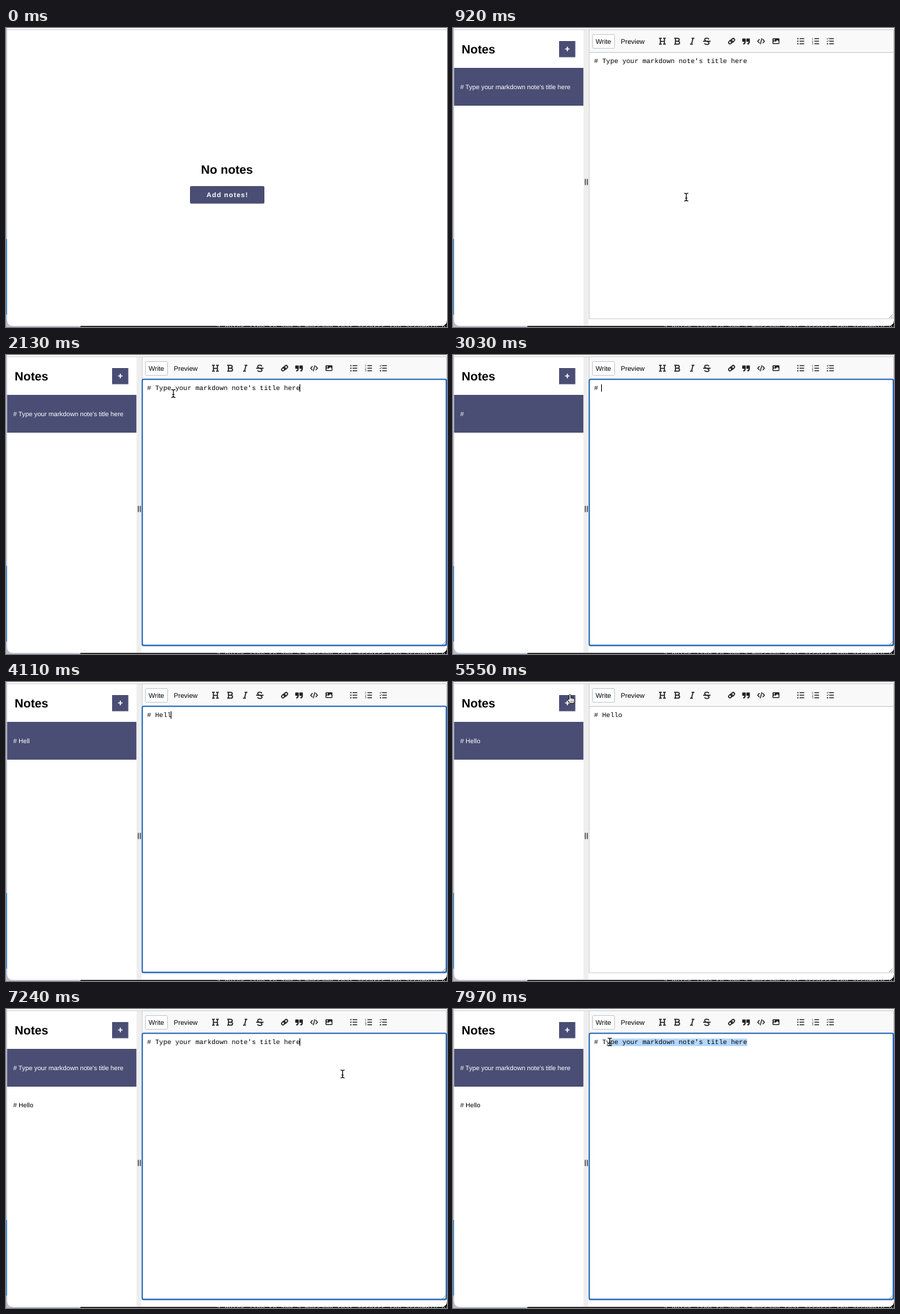
These frames come from a looping animation (640x435 px, 8 s). An HTML page:

```html
<!DOCTYPE html>
<html lang="en">
<head>
<meta charset="utf-8">
<title>Markdown notes</title>
<style>
html, body { margin: 0; width: 100%; height: 100%; overflow: hidden; background: #fff; }
svg { display: block; width: 640px; height: 435px; }
text { font: 9.73px Arial, "Liberation Sans", sans-serif; text-rendering: geometricPrecision; white-space: pre; }
.mono { font-family: "Courier New", "Liberation Mono", monospace; }
.title { font-size: 17.6px; font-weight: bold; }
.note { font-size: 9.35px; }
.line { fill: none; stroke: #222; stroke-width: 1.5; }
</style>
</head>
<body>
<svg viewBox="0 0 640 435">
  <!-- desktop behind the window -->
  <rect width="640" height="435" fill="#b9bccb"/>
  <rect y="307" width="2" height="110" fill="#2f7fc0"/>
  <rect x="108" y="420" width="532" height="15" fill="#050505"/>
  <text class="mono" x="288" y="438" fill="#bbb">-  a quick line to add a message that asserts the assembly has</text>
  <path d="M1.5 0H640V425q0 8.500-9 8.500H10.500q-9 0-9-9z" fill="#fff"/>
  <rect x="1.500" y="2" width="638.500" height="1" fill="#d2d2d6"/>

  <g id="empty">
    <text class="title" x="320.700" y="211.500" text-anchor="middle">No notes</text>
    <rect x="267" y="230" width="108" height="25.500" rx="2" fill="#4a4e74"/>
    <text x="291" y="246.300" fill="#fff" font-weight="bold" style="font-weight:bold" letter-spacing="1">Add notes!</text>
  </g>

  <g id="app">
    <text class="title" x="12.500" y="36.500">Notes</text>
    <rect x="154" y="19" width="23.500" height="23.500" fill="#4a4e74"/>
    <path d="M162.700 30.500h6.400M165.900 27.300v6.400" stroke="#fff" stroke-width="1.600"/>
    <rect x="1.500" y="58" width="188" height="55" fill="#4a4e74"/>
    <text class="note" id="first" x="10.500" y="89.300" fill="#fff"></text>
    <text class="note" id="second" x="10.500" y="143.300"># Hello</text>

    <rect x="189.500" y="3" width="7" height="430" fill="#eee"/>
    <path d="M192 219.500v9M195 219.500v9" stroke="#222" stroke-width="1.200"/>

    <rect x="197.500" y="2.500" width="442" height="420.500" fill="#fff" stroke="#c8ccd0"/>
    <path d="M198 3h441v32h-441z" fill="#f9f9f9"/>
    <path d="M198 35.500h441" stroke="#c8ccd0"/>
    <rect x="202.500" y="9.500" width="32" height="20" rx="1" fill="#fff" stroke="#c8ccd0"/>
    <text x="207" y="22.600">Write</text>
    <text x="243.500" y="22.600">Preview</text>

    <g id="icons" fill="#222">
      <path class="line" d="M301 15v9M306.800 15v9M301 19.500h6M299 15h4M304.800 15h4M299 23.500h4M304.800 23.500h4"/>
      <path class="line" d="M322.800 15v9M321 15h5q2.300 0 2.300 2t-2.300 2.200h-3M326 19.200q2.800 0 2.800 2.200t-2.800 2.200h-5"/>
      <path class="line" d="M348.300 15l-2.200 8.600M346.300 15h4M344 23.500h4"/>
      <path class="line" d="M371.500 16.500q-1-1.700-3.200-1.700q-3 0-3 2t3 2.600q3.300.6 3.300 2.600t-3.300 2.100q-2.500 0-3.300-1.800M363 19.300h10.800" stroke-width="1.400"/>
      <g class="line" transform="translate(404.300 19.200) rotate(-45)">
        <rect x="-5" y="-2.300" width="6" height="4" rx="2"/>
        <rect x="-1" y="-1.700" width="6" height="4" rx="2"/>
      </g>
      <path id="quote" d="M420.500 15.200h3.500q.8 0 .8.800v4q0 4-3.600 4v-1.700q1.600 0 1.600-2.300h-2.300q-.8 0-.8-.8v-3.200q0-.8.8-.8z"/>
      <use href="#quote" x="6"/>
      <path class="line" d="M444.800 16.300l-2.600 2.900l2.600 2.900M449.400 16.300l2.600 2.900l-2.600 2.900M448.200 14.800l-2.200 8.800" style="stroke-width:1.300"/>
      <rect x="463.700" y="15" width="10" height="8.300" rx="1"/>
      <path d="M465 22v-1.500l1.600-1.500l1.300 1.200l2.800-2.700l1.800 2v2.500z" fill="#fff"/>
      <circle cx="466.200" cy="17.300" r="1" fill="#fff"/>
    </g>

    <rect id="selection" y="43" height="11" fill="#b3d7ff"/>
    <text class="mono" id="editor" x="204.800" y="51.300" style="font-size:9.740px"></text>
    <rect id="caret" y="42.500" width="1" height="11" fill="#000"/>
    <path d="M633 422l5-5M636 422l2-2" stroke="#777" stroke-width=".8"/>
    <rect id="focus" x="197.700" y="35.300" width="441.300" height="387.200" rx="2" fill="none" stroke="#1a60b8" stroke-width="1.800"/>
  </g>

  <g id="cursor" stroke-linejoin="round">
    <path id="arrow" d="M0 0v11.500l2.700-2.500l1.800 4l1.900-.8l-1.800-3.900h3.700z" fill="#000" stroke="#fff" stroke-width=".9"/>
    <g id="hand" fill="#fff" stroke="#000" stroke-width=".9">
      <path d="M-1.500 6.300V.4a1.200 1.200 0 0 1 2.400 0V4.200q1.200-.9 2.100.2q1.200-.7 1.900.5q1.700-.3 1.700 1.300v2.400l-1.100 3.300h-5.600L-3.600 7.500q-.5-1.800.9-1.500z"/>
      <path d="M.9 4.200v2.300M3 4.600v2M4.900 5.200v1.700M.9 8v2M2.700 8v2M4.500 8v2" stroke-width=".6"/>
    </g>
    <g id="beam" fill="none">
      <path id="stem" d="M-3-5.700q3 0 3 1.700v8q0 1.700-3 1.700M3-5.700q-3 0-3 1.700v8q0 1.700 3 1.700M-1.600 1.500h3.200" stroke="#fff" stroke-width="2.200" stroke-opacity=".8"/>
      <path d="M-3-5.700q3 0 3 1.700v8q0 1.700-3 1.700M3-5.700q-3 0-3 1.700v8q0 1.700 3 1.700M-1.600 1.500h3.200" stroke="#000" stroke-width="1.100"/>
    </g>
  </g>
</svg>
<script>
const LOOP = 8000, LEFT = 204.8, CHAR = 5.845;
const PLACEHOLDER = "# Type your markdown note's title here";
const $ = id => document.getElementById(id);
const show = (id, on) => $(id).setAttribute("visibility", on ? "inherit" : "hidden");
const between = (t, a, b) => t >= a && t < b;

// Mouse path: time, x, y
const path = [
  [0, 434, 440], [30, 432, 432], [380, 378, 330], [740, 338.5, 246], [1110, 338.5, 246],
  [1500, 325, 150], [1890, 285, 70], [2130, 243, 56], [2680, 218, 52], [2740, 218, 52],
  [2890, 219, 52], [5030, 219, 52], [5300, 189, 36], [5520, 170, 19], [5820, 170, 19],
  [6260, 249, 57], [6450, 249, 57], [7150, 488.5, 94.5], [7260, 488.5, 94.5],
  [7970, 227.5, 48], [LOOP, 227.5, 48]
];

// Text of the edited note from each time on
const edits = [
  [0, PLACEHOLDER], [3030, "# "], [3720, "# H"], [3840, "# He"], [3980, "# Hel"],
  [4100, "# Hell"], [4240, "# Hello"], [5610, PLACEHOLDER]
];

// Speed at a key; zero where the mouse rests
function slope(i, axis) {
  const a = path[i - 1], b = path[i], c = path[i + 1];
  if (!a || !c || a[axis] === b[axis] || b[axis] === c[axis]) return 0;
  return (c[axis] - a[axis]) / (c[0] - a[0]);
}

function mouseAt(t) {
  const i = Math.max(0, path.findIndex(p => p[0] > t) - 1);
  const a = path[i], b = path[i + 1], d = b[0] - a[0], u = (t - a[0]) / d;
  return [1, 2].map(k => {
    const s = u * u * (3 - 2 * u);
    return a[k] + (b[k] - a[k]) * s
      + d * u * (1 - u) * ((1 - u) * slope(i, k) - u * slope(i + 1, k));
  });
}

function cursorShape(t, x, y) {
  if (t < 920) return y < 255 ? "hand" : "arrow";
  if (x > 197 && y > 35) return "beam";
  return between(x, 154, 178) && between(y, 18.5, 43) ? "hand" : "arrow";
}

// Listed separately for the canvas-free list icons of the toolbar
function drawLists() {
  const shapes = [];
  [499.5, 521, 542.5].forEach((x, kind) => [15.5, 19.2, 22.9].forEach((y, row) => {
    shapes.push(`<path class="line" d="M${x + 3.5} ${y}h6.700" style="stroke-width:1.300"/>`);
    if (kind === 0) shapes.push(`<circle cx="${x + 1}" cy="${y}" r="1"/>`);
    if (kind === 1) shapes.push(`<text x="${x - .3}" y="${y + 1.4}" style="font-size:4px">${row + 1}</text>`);
    if (kind === 2) shapes.push(row < 2
      ? `<path class="line" d="M${x} ${y}l.8.900l1.600-2" style="stroke-width:.9"/>`
      : `<circle cx="${x + 1}" cy="${y}" r="1"/>`);
  }));
  $("icons").insertAdjacentHTML("beforeend", shapes.join(""));
}

function draw(t) {
  const [x, y] = mouseAt(t);
  const text = edits.filter(e => e[0] <= t).pop()[1];
  const focused = between(t, 1800, 5470) || t >= 7160;
  const dragging = between(t, 1890, 3030) || t >= 7260;
  const selected = dragging && y < 55;
  const end = LEFT + CHAR * text.length;

  show("empty", t < 840);
  show("app", t >= 840);
  show("second", t >= 5610);
  $("first").textContent = $("editor").textContent = text;

  show("focus", focused);
  show("caret", focused && !selected && !between(t, 4390, 5470));
  $("caret").setAttribute("x", Math.floor(end - .5));
  show("selection", selected);
  if (selected) {
    const index = Math.min(text.length, Math.max(0, Math.round((x - LEFT) / CHAR)));
    $("selection").setAttribute("x", LEFT + CHAR * index);
    $("selection").setAttribute("width", CHAR * (text.length - index));
  }

  show("cursor", t >= 30 && !between(t, 3030, 4890));
  const shape = cursorShape(t, x, y);
  for (const id of ["arrow", "hand", "beam"]) $(id).style.display = id === shape ? "" : "none";
  $("cursor").setAttribute("transform", `translate(${x} ${y})`);
}

drawLists();
const start = performance.now();
function tick() {
  draw((performance.now() - start) % LOOP);
  requestAnimationFrame(tick);
}
tick();
</script>
</body>
</html>
```
